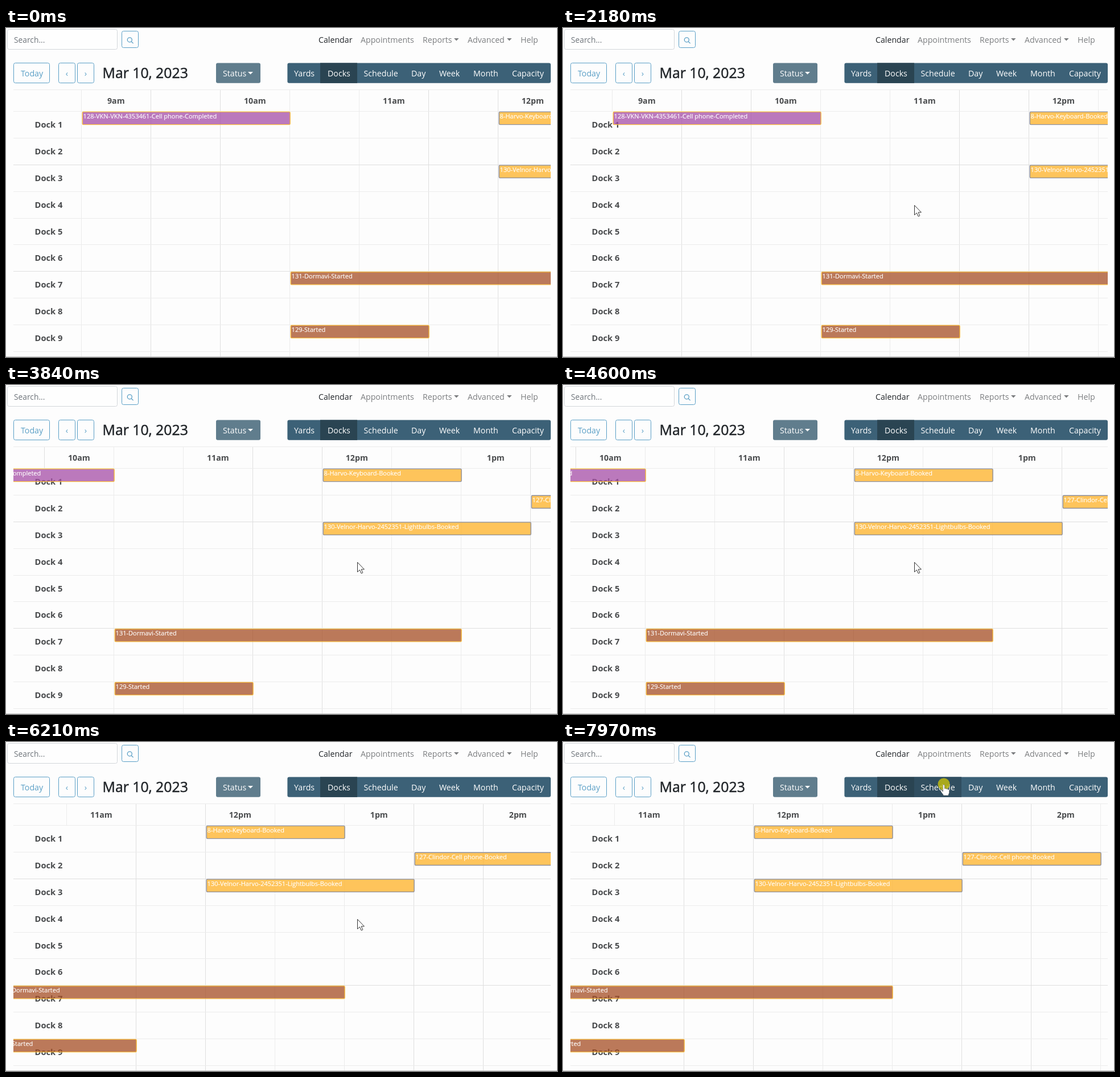
An HTML page that plays this animation: 968x578 px, repeating every 8 s.

```html
<!DOCTYPE html>
<html lang="en">
<head>
<meta charset="utf-8">
<title>Dock calendar</title>
<style>
  html, body { margin: 0; width: 100%; height: 100%; overflow: hidden; background: #fdfdfd; }
  svg { display: block; width: 968px; height: 578px; }
  text { font: 14.2px "Open Sans", "Noto Sans", sans-serif; white-space: pre; }
  .nav { fill: #7c7e80; }
  .dark { fill: #212529; }
  .title { font-size: 24.8px; fill: #212529; stroke: #212529; stroke-width: .5; }
  .btn { fill: #fdfdfd; stroke: #5a9fc6; }
  .link { fill: #5a9fc6; }
  .white { fill: #fff; }
  .bold { font-weight: 700; fill: #494b4d; }
  .dock { font-size: 14.7px; }
  .mid { text-anchor: middle; }
  .event text { font-size: 11px; fill: #fff; stroke: #fff; stroke-width: .15; }
</style>
</head>
<body>
<svg viewBox="0 0 968 578">
  <defs>
    <clipPath id="view"><rect x="13" y="108" width="944" height="470"/></clipPath>
  </defs>
  <rect x="2.5" y="2.5" width="193" height="35" rx="3" fill="#fefefe" stroke="#d3d6da"/>
  <text x="14" y="26" fill="#6f757b" style="font-size:13.8px">Search...</text>
  <rect class="btn" x="203.5" y="5.5" width="29" height="29" rx="3"/>
  <g fill="none" stroke="#5a9fc6" stroke-width="1.3">
    <circle cx="217.3" cy="20.8" r="4"/>
    <path d="M220.2 23.7l3.4 3.4"/>
  </g>
  <g id="nav"></g>
  <rect class="btn" x="13.5" y="61.5" width="63" height="35" rx="3"/>
  <rect class="btn" x="92.5" y="61.5" width="29" height="35" rx="3"/>
  <rect class="btn" x="125.5" y="61.5" width="29" height="35" rx="3"/>
  <text class="link" x="26" y="85">Today</text>
  <text class="link mid" x="107" y="85">‹</text>
  <text class="link mid" x="140" y="85">›</text>
  <text class="title" x="169.5" y="88">Mar 10, 2023</text>
  <rect x="369" y="61.4" width="78" height="35.4" rx="3" fill="#607d8d"/>
  <text class="white" x="381" y="85">Status</text>
  <path class="white" d="M425 77h9l-4.5 4.5z"/>
  <rect x="494.4" y="61.4" width="462.6" height="35.4" rx="3" fill="#3c6177"/>
  <rect x="552" y="61.4" width="65" height="35.4" fill="#2a4452"/>
  <rect id="hover" x="617" y="61.4" width="83" height="35.4" fill="#304e60"/>
  <g id="tabs"></g>

  <g clip-path="url(#view)">
    <g id="lines"></g>
    <rect x="13" y="146" width="119" height="432" fill="#fdfdfd"/>
    <g id="rows"></g>
    <g id="head"></g>
    <g id="events"></g>
  </g>
  <rect y="577" width="968" height="1" fill="#c8c8c8"/>

  <circle id="click" cx="669" cy="74" r="10.5" fill="#c8c00c" fill-opacity=".8"/>
  <path id="arrow" d="M.5 .5V17.5L4.4 13.9L7.2 20L9.8 18.8L7.1 12.9H12.4Z"
    fill="#fff" stroke="#333" stroke-linejoin="round"/>
  <path id="hand" d="M-1.6 1.2C-1.6-.6 1.4-.6 1.4 1.2V7C2 6 4 6.6 4.4 7.6C5.2 6.7 7 7.2 7.2 8.4C8.2 7.9 9.6 8.5 9.6 10V13.5C9.6 15.5 8.2 16.5 8 19H-.6C-1 16.6-4 14.6-5.4 11.6C-6.2 9.8-4 9-2.9 10.4L-1.6 12Z"
    fill="#fff" stroke="#333" stroke-width=".5" stroke-linejoin="round"/>
</svg>
<script>
const $ = id => document.getElementById(id);
const LOOP = 8000, TICK = 59, CELL = 122, LEFT = 132, TOP = 146, ROW = 46.875;
const rowY = n => TOP + ROW * n;
const text = (x, y, cls, s) => `<text x="${x}" y="${y}" class="${cls}">${s}</text>`;
const bar = (x, y, w, h, dark) =>
  `<rect x="${x}" y="${y}" width="${w}" height="${h}" fill="${dark ? '#dfdfdf' : '#ececec'}"/>`;
const range = (n, f) => Array.from({ length: n }, (_, i) => f(i)).join('');

$('nav').innerHTML = [['Calendar', 549], ['Appointments', 623], ['Reports', 732], ['Advanced', 811], ['Help', 904]]
  .map(([s, x], i) => text(x, 26, i ? 'nav' : 'dark', s)).join('') +
  [787, 880].map(x => `<path class="nav" d="M${x} 18h8.6l-4.3 4.4z"/>`).join('');

$('tabs').innerHTML = [['Yards', 506], ['Docks', 565], ['Schedule', 628.5], ['Day', 712], ['Week', 761], ['Month', 821], ['Capacity', 889]]
  .map(([s, x]) => text(x, 85, 'white', s)).join('');

// Grid: column lines alternate in pairs of weights.
const darkCol = i => (i + 3) % 4 < 2;
$('lines').innerHTML = range(14, i => bar(LEFT + CELL * i, TOP, 1, 432, darkCol(i)));
$('head').innerHTML = range(14, i => bar(LEFT + CELL * i, 109, 1, 37, darkCol(i))) +
  ['9am', '10am', '11am', '12pm', '1pm', '2pm', '3pm']
    .map((s, i) => text(193.3 + 2 * CELL * i, 133, 'bold mid', s)).join('');
$('rows').innerHTML = bar(13, 108, 944, 1) +
  range(10, i => bar(13, Math.round(rowY(i)), 944, 1, i === 2 || i === 6)) +
  range(9, i => text(75, rowY(i) + 29, 'bold dock mid', 'Dock ' + (i + 1)));

const PURPLE = '166,78,167', BROWN = '166,78,36', YELLOW = '255,178,38';
const AMBER = '#f6b83c', GREY = '#8f8f98';
// [row, first cell, cells, fill, border, label]
$('events').innerHTML = [
  [0, 0, 3, PURPLE, AMBER, '128-VKN-VKN-4353461-Cell phone-Completed'],
  [0, 6, 2, YELLOW, GREY, '8-Harvo-Keyboard-Booked'],
  [1, 9, 2, YELLOW, GREY, '127-Clindor-Cell phone-Booked'],
  [2, 6, 3, YELLOW, GREY, '130-Velnor-Harvo-2452351-Lightbulbs-Booked'],
  [6, 3, 5, BROWN, AMBER, '131-Dormavi-Started'],
  [8, 3, 2, BROWN, AMBER, '129-Started']
].map(([row, cell, n, fill, edge, label]) => {
  const x = LEFT + 1.6 + CELL * cell, y = rowY(row) + .7;
  return `<g class="event"><rect x="${x + .7}" y="${y + .7}" width="${CELL * n - 1.2}" height="22.2" rx="1.5"
    fill="rgba(${fill},.75)" stroke="${edge}" stroke-width="1.4"/>${text(x + 2, y + 12.1, '', label)}</g>`;
}).join('');

// Scroll offset through (time, px) points with a monotone cubic.
const path = [[0, 0], [1421, 0], [1480, 1], [2188, 52], [2837, 146], [3131, 146], [3190, 148], [3839, 309],
  [4134, 350], [4481, 350], [4540, 351], [5189, 453], [6192, 514], [6723, 530], [LOOP, 530]];
const slope = i => (path[i + 1][1] - path[i][1]) / (path[i + 1][0] - path[i][0]);
const tangent = i => {
  if (i === 0 || i === path.length - 1) return 0;
  const a = slope(i - 1), b = slope(i);
  return a * b > 0 ? 2 * a * b / (a + b) : 0;
};
function offset(t) {
  let i = 0;
  while (i < path.length - 2 && t >= path[i + 1][0]) i++;
  const [t0, y0] = path[i], [t1, y1] = path[i + 1];
  const h = t1 - t0, u = (t - t0) / h, v = 1 - u;
  return y0 * (1 + 2 * u) * v * v + y1 * u * u * (3 - 2 * u) +
    h * u * v * (tangent(i) * v - tangent(i + 1) * u);
}

// Movement advances in ticks counted from the start of each run.
const runs = [0, 450, 1480, 3190, 4540, 7320];
function held(t) {
  const start = runs.filter(r => r <= t).pop();
  return start + Math.floor((t - start) / TICK) * TICK;
}

const clamp = u => Math.max(0, Math.min(1, u));
const mix = (a, b, u) => Math.round(a + (b - a) * u);
function pointer(t) {
  if (t < 1000) {
    const u = clamp((t - 450) / 295), e = 1 - (1 - u) ** 2;
    return [mix(743, 617, e), mix(447, 311, e)];
  }
  const u = clamp((t - 7261) / 560), e = u * u * (3 - 2 * u);
  return [mix(617, 669, e), mix(311, 75, e)];
}

const show = (id, on) => $(id).setAttribute('visibility', on ? 'visible' : 'hidden');
function draw(now) {
  const t = now % LOOP, s = held(t);
  const move = `translate(${-Math.round(offset(s))} 0)`;
  for (const id of ['lines', 'head', 'events']) $(id).setAttribute('transform', move);

  const [x, y] = pointer(s), over = y < 97;
  for (const id of ['arrow', 'hand']) $(id).setAttribute('transform', `translate(${x} ${y})`);
  show('arrow', t >= 450 && !over);
  show('hand', over);
  show('hover', over);
  show('click', t >= 7905);
}

const origin = performance.now();
function frame() {
  draw(performance.now() - origin);
  requestAnimationFrame(frame);
}
frame();
</script>
</body>
</html>
```
